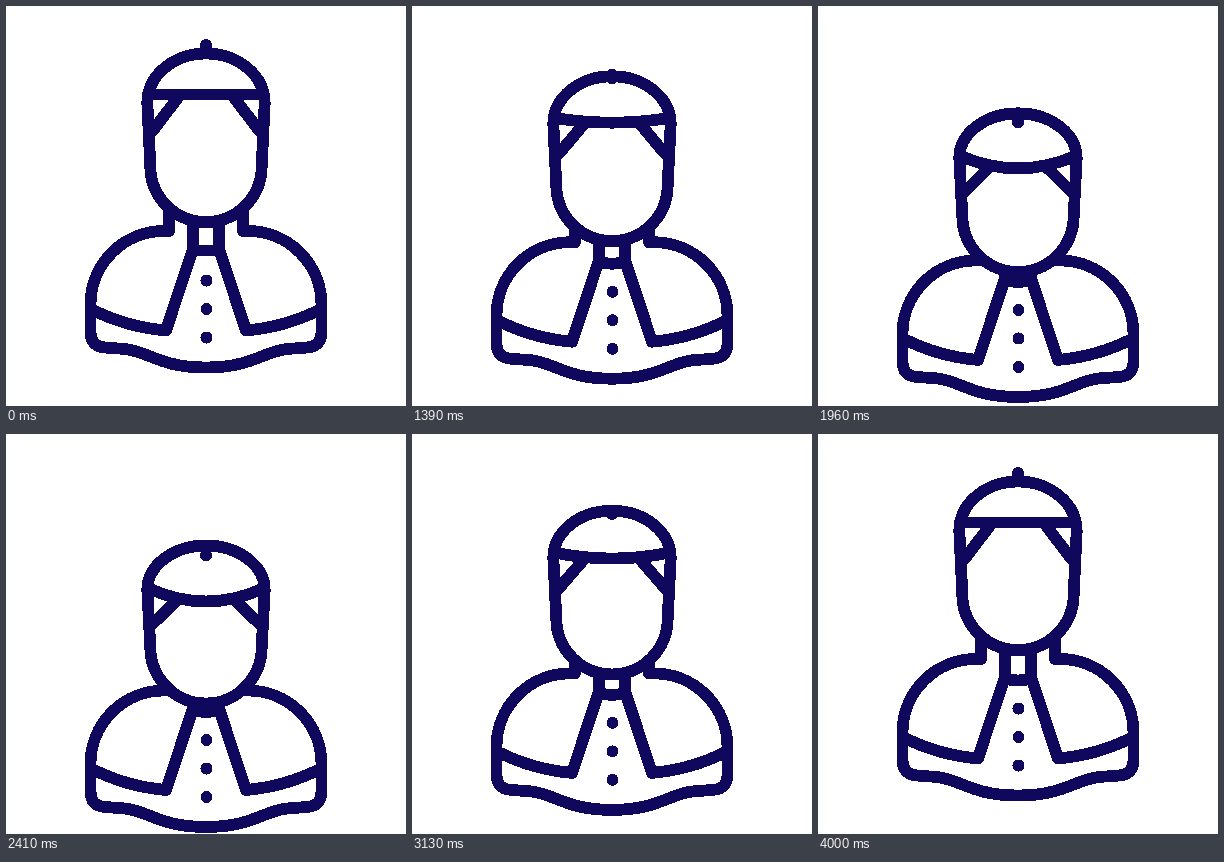
An HTML page that plays this animation: 400x400 px, repeating every 4030 ms.

```html
<!DOCTYPE html>
<html lang="en">
<head>
<meta charset="utf-8">
<style>
  html, body { margin: 0; width: 100%; height: 100%; overflow: hidden; background: #fff; }
  svg { display: block; width: 100vw; height: 100vh; shape-rendering: crispEdges; }
  .line { fill: none; stroke: #10085c; stroke-width: 11.8; stroke-linecap: round; stroke-linejoin: round; }
  #face { fill: #fff; }
</style>
</head>
<body>
<svg viewBox="0 0 400 400">
  <g class="line">
    <g id="half">
      <g class="body">
        <path d="M163 203V225H158A73.5 73.5 0 0 0 84.5 298.5V326Q84.5 340.5 99 341.5L119 343C143 345.5 154 361.5 200 361.5"/>
        <path d="M187 214V243L160 324.5Q120 321 85 303"/>
      </g>
      <path id="face"/>
      <path id="hair"/>
    </g>
    <use href="#half" transform="matrix(-1 0 0 1 400 0)"/>
    <path id="collar"/>
    <path id="band"/>
    <path id="knob"/>
  </g>
  <g class="body" fill="#10085c">
    <circle cx="200.5" cy="274.5" r="6"/>
    <circle cx="200.5" cy="303" r="6"/>
    <circle cx="200.5" cy="331.5" r="6"/>
  </g>
</svg>
<script>
  const LOOP = 4030, STEP = 30;
  const bodies = document.querySelectorAll('.body');
  const setPath = (id, d) => document.getElementById(id).setAttribute('d', d);

  // Cubic bezier easing (a, 0, b, 1), solved by bisection.
  function ease(u, a, b) {
    if (u <= 0) return 0;
    if (u >= 1) return 1;
    let lo = 0, hi = 1, s;
    for (let i = 0; i < 24; i++) {
      s = (lo + hi) / 2;
      const x = 3 * s * (1 - s) ** 2 * a + 3 * s * s * (1 - s) * b + s ** 3;
      if (x < u) lo = s; else hi = s;
    }
    return s * s * (3 - 2 * s);
  }

  // Bow amount: 0 upright, 1 fully bowed.
  const bow = t => t < 2400
    ? ease((t - 1000) / 1400, 0.37, 0.16)
    : 1 - ease((t - 2400) / 1600, 0.42, 0.39);

  function draw(p) {
    const drop = 31.5 * p;
    const top = 47.5 + 64 * p, temple = 97 + 59 * p;
    const jaw = 160 + 53 * p, chin = 216 + 53.5 * p;
    const brow = 88.5 + 66 * p, sag = p > 0 ? 4 : 0;
    for (const b of bodies) b.setAttribute('transform', `translate(0 ${drop})`);
    setPath('face', `M200 ${top}A58.7 ${temple - top} 0 0 0 141.3 ${temple}L144.3 ${jaw}C144.3 ${jaw + 31} 169 ${chin} 200 ${chin}`);
    setPath('hair', `M172 ${91.5 + 74 * p}L147 ${124.5 + 65 * p}`);
    setPath('collar', `M187 ${244.5 + drop}q13 ${sag} 26 0`);
    setPath('band', `M143 ${brow}Q200 ${88.5 + 92 * p} 257 ${brow}`);
    setPath('knob', `M200 ${39 + 82.5 * p}V${45 + 76.6 * p}`);
  }

  const start = performance.now();
  function tick() {
    const t = (performance.now() - start) % LOOP;
    draw(bow(Math.floor(t / STEP) * STEP));
    requestAnimationFrame(tick);
  }
  tick();
</script>
</body>
</html>
```
